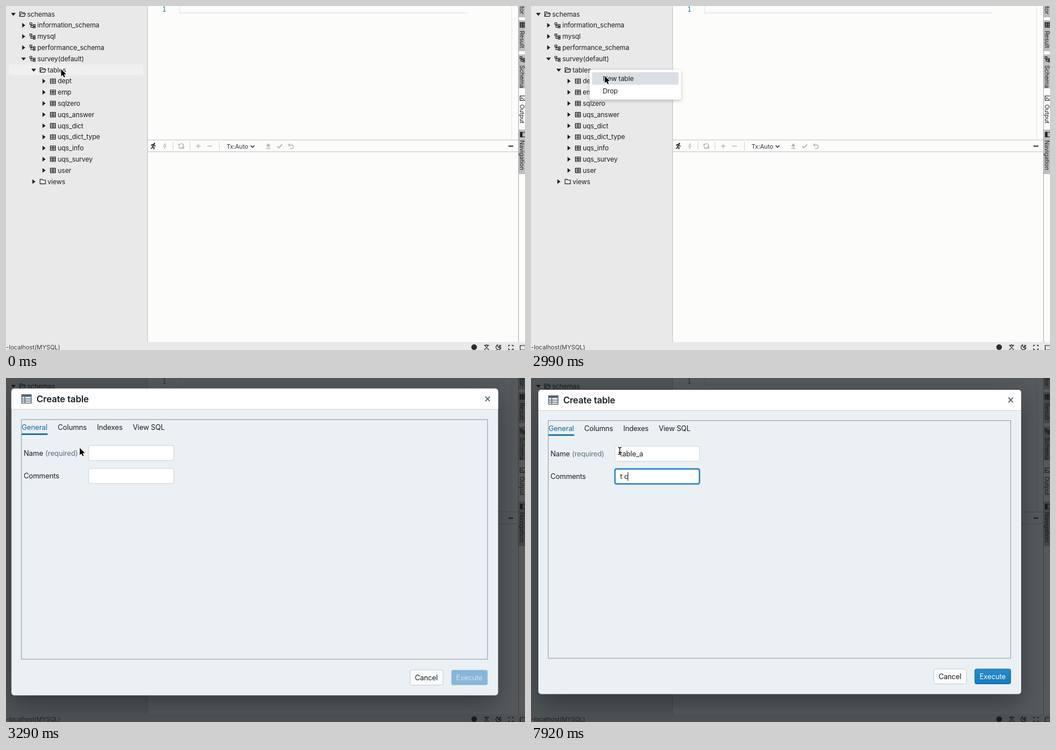
These frames come from a looping animation (918x610 px, 8000 ms). An HTML page with a canvas:

```html
<!DOCTYPE html>
<html lang="en">
<head>
<meta charset="utf-8">
<title>Create table</title>
<style>
html, body { margin: 0; width: 100%; height: 100%; overflow: hidden; background: #fcfcfb; }
canvas { display: block; }
</style>
</head>
<body>
<canvas id="stage" width="918" height="610"></canvas>
<script>
const W = 918, H = 610, LOOP = 8000;
const stage = document.getElementById('stage').getContext('2d');
const layer = document.createElement('canvas');
layer.width = W;
layer.height = H;
const sheet = layer.getContext('2d');
let g = stage;

const SANS = 'Inter, "Open Sans", sans-serif';
const MONO = '"DejaVu Sans Mono", monospace';
const INK = '#1b1e21', PALE = '#b4b6b8', BLUE = '#106ba3', SLATE = '#566574';

// Drawing helpers
function text(str, x, y, size, color = INK, { weight = 400, gap = -0.1, family = SANS } = {}) {
  g.font = `${weight} ${size}px ${family}`;
  g.letterSpacing = gap + 'px';
  g.fillStyle = color;
  g.fillText(str, x, y + size * 0.36);
}

function box(x, y, w, h, color) {
  g.fillStyle = color;
  g.fillRect(x, y, w, h);
}

function round(x, y, w, h, r, fill, border) {
  g.beginPath();
  g.roundRect(x, y, w, h, r);
  if (fill) { g.fillStyle = fill; g.fill(); }
  if (border) { g.strokeStyle = border; g.lineWidth = 1; g.stroke(); }
}

// Icon given as SVG path data around a centre
function icon(d, x, y, color = INK, { width = 1.2, fill = false } = {}) {
  g.save();
  g.translate(x, y);
  g.lineWidth = width;
  g.strokeStyle = g.fillStyle = color;
  const p = new Path2D(d);
  fill ? g.fill(p) : g.stroke(p);
  g.restore();
}

function shadow(color, y, blur) {
  g.shadowColor = color;
  g.shadowOffsetY = y;
  g.shadowBlur = blur;
}

const at = (keys, t) => keys.findLast(k => k[0] <= t);
const clamp = (v, lo, hi) => Math.min(hi, Math.max(lo, v));

const ICON = {
  down: 'M-4.2-2.2H4.2L0 3Z',
  right: 'M-2.4-4.2L3 0L-2.4 4.2Z',
  open: 'M-4.8 4V-3.8H-1L.3-2.4H3.8V-.6M-4.8 4L-2.8-.6H5.4L3.6 4Z',
  folder: 'M-4.8 4V-4H-1L.3-2.6H4.8V4Z',
  schema: 'M-4.8-4.4H-1.2V-1.2H-4.8ZM-3-1.2V3.4H.8M-3 .2H.8M1.2-1.4H4.6V1H1.2ZM1.2 2.4H4.6V4.6H1.2Z',
  table: 'M-4.5-4H4.5V4H-4.5ZM-4.5-1.4H4.5M-4.5 1.3H4.5M0-4V4',
  runner: 'M.6-3L-1.2 1L1.4 2.6L.8 5.6M-1.2 1L-2 3.2L-4.4 4.4M-3.4-.6L-2.4-2.8L.8-2.6L2.2-.4L4.2-.2',
  bolt: 'M.6-5L-2.6.8H-.2L-.8 5L2.6-1H.2Z',
  refresh: 'M4.6-.6A4.7 4.7 0 0 0-4-2.2M-4.6.6A4.7 4.7 0 0 0 4-2.2M-4.6-4.4V-1.6H-2M4.6 4.4V1.6H2M4.6.6A4.7 4.7 0 0 1-4 2.4',
  plus: 'M-4 0H4M0-4V4',
  minus: 'M-4.2 0H4.2',
  chevron: 'M-3.3-1.6L0 1.7L3.3-1.6',
  upload: 'M0-5L4-.6H1.4V2H-1.4V-.6H-4ZM-4 3.2H4V4.8H-4Z',
  check: 'M-4.2.2L-1.4 3L4.4-3.2',
  undo: 'M-1.8-4.6L-4.4-2L-1.8.6M-4.2-2H1.4A3 3 0 0 1 1.4 4H-1.6',
  terminal: 'M-4.6-4H5V4H-4.6ZM-2.6-1.6L-.8 0L-2.6 1.6M.4 1.8H3',
  translate: 'M-4.4-3.4H4.4M0-5V-3.4M-2.8-3.4C-1.6.2 1.4 3 4.2 4.4M2.8-3.4C1.6.2-1.4 3-4.2 4.4',
  moon: 'M-1-4.4A4.6 4.6 0 1 0 4.6 1.6A4.6 4.6 0 0 1-1-4.4M1.2-3.2H4.2L1.2-.4H4.4',
  full: 'M-4-1.4V-4H-1.4M1.4-4H4V-1.4M4 1.4V4H1.4M-1.4 4H-4V1.4',
  square: 'M-4-4H5V4H-4Z',
  close: 'M-4-4L4 4M4-4L-4 4',
  arrow: 'M0 0V12.8L2.9 10.1L4.9 14.6L7 13.7L5 9.3H9Z',
  beam: 'M-3-6.2Q0-6.2 0-4.4Q0-6.2 3-6.2M0-4.6V4.8M-3 6.2Q0 6.2 0 4.6Q0 6.2 3 6.2M-2 2.6H2'
};

// Tree: level, label, icon, expanded
const ROWS = [
  [0, 'schemas', 'open', 1],
  [1, 'information_schema', 'schema'],
  [1, 'mysql', 'schema'],
  [1, 'performance_schema', 'schema'],
  [1, 'survey(default)', 'schema', 1],
  [2, 'tables', 'open', 1],
  ...['dept', 'emp', 'sqlzero', 'uqs_answer', 'uqs_dict', 'uqs_dict_type',
    'uqs_info', 'uqs_survey', 'user'].map(s => [3, s, 'table']),
  [2, 'views', 'folder']
];
const PITCH = 19.8;

function tree(hover) {
  box(0, 0, 250, H, '#e9e9e9');
  if (hover >= 0) box(5, 4.5 + hover * PITCH, 238, 19, '#f0f0f0');
  ROWS.forEach(([level, label, kind, expanded], i) => {
    const x = level * 18, y = 14.4 + i * PITCH;
    icon(expanded ? ICON.down : ICON.right, x + 13, y, INK, { fill: true });
    icon(ICON[kind], x + 29, y, INK, { width: 1.1 });
    text(label, x + 37.5, y, 11.7);
  });
}

function editor() {
  box(250, 0, W - 250, 596, '#fcfcfb');
  text('1', 276.5, 5.5, 11.5, '#237893', { family: MONO, gap: 0 });
  box(307, 11.5, 509, 1.8, '#e8e8e8');
  box(306.5, 0, 1, 13, '#e2e2e2');
  box(894, 0, 1, 237, '#e4e4e4');
  box(250, 0, 1, 596, '#c3c3c3');
  box(250, 237, 657, 1, '#c3c3c3');
  box(250, 258, 657, 1, '#c3c3c3');
}

function toolbar() {
  const y = 248.5;
  icon(ICON.runner, 260.5, y, INK, { width: 1.5 });
  icon('M.4-5.6H3V-3H.4Z', 260.5, y, INK, { fill: true });
  icon(ICON.bolt, 281, y, PALE, { width: 1 });
  icon(ICON.refresh, 310, y, PALE);
  icon(ICON.plus, 340, y, PALE, { width: 1.4 });
  icon(ICON.minus, 360, y, PALE, { width: 1.4 });
  for (const x of [295, 325, 377]) box(x, 241, 1, 15, '#cfcfcf');
  text('Tx:Auto', 390, y + 0.5, 10.8, '#33373a');
  icon(ICON.chevron, 436, y + 0.5, '#33373a', { width: 1.6 });
  icon(ICON.upload, 464, y, PALE, { fill: true });
  icon(ICON.check, 484, y, PALE, { width: 1.9 });
  icon(ICON.undo, 504, y, PALE, { width: 1.3 });
  icon(ICON.minus, 893, y, INK, { width: 1.9 });
}

function sidebar() {
  box(906, 0, 1, 596, '#a9a9a9');
  // top, height, text start, label
  const tabs = [[0, 20, -14, 'Editor'], [25, 55, 44, 'Result'], [86, 60, 105, 'Schema'],
    [152, 62, 174.5, 'Output'], [219, 79, 238, 'Navigation']];
  for (const [top, h, start, label] of tabs) {
    if (label !== 'Output') box(907, top, 11, h, '#bdbdbd');
    g.save();
    g.translate(913, start);
    g.rotate(Math.PI / 2);
    text(label, 0, 0, 10.7);
    g.restore();
  }
  icon(ICON.table, 914, 33.5, INK, { width: 1.5 });
  icon(ICON.schema, 914, 94.5);
  icon(ICON.terminal, 914, 163.5);
  icon(ICON.square, 914, 228);
  box(909.5, 223.5, 4, 9, INK);
}

function statusBar() {
  box(0, 596, W, 14, '#e9e9e9');
  text('l-localhost(MYSQL)', -2.2, 605.5, 10.8, '#3a3d40');
  g.beginPath();
  g.arc(828, 605, 5, 0, 7);
  g.fillStyle = '#2b2e31';
  g.fill();
  icon(ICON.translate, 850, 605);
  icon(ICON.moon, 871, 605);
  icon(ICON.full, 893, 605.5);
  icon(ICON.square, 913.5, 606);
}

function menu(state) {
  g.save();
  shadow('rgba(16,22,26,.25)', 2, 6);
  round(103.5, 113, 162, 53, 3, '#fff');
  g.restore();
  if (state) round(108, 117.5, 153, 22, 2, state > 1 ? '#d9dfe4' : '#e6eaed');
  text('New table', 127, 128.5, 11.7);
  text('Drop', 127, 150.5, 11.7);
}

function field(x, y, str, focus, caret) {
  round(x, y, 149.5, 26.5, 3, '#fff', '#cdd3d8');
  if (focus) {
    g.save();
    g.globalAlpha *= focus;
    g.lineWidth = 3.6;
    g.strokeStyle = 'rgba(19,124,189,.3)';
    g.stroke();
    g.lineWidth = 1.9;
    g.strokeStyle = '#1c80c0';
    g.stroke();
    g.restore();
  }
  text(str, x + 9, y + 13.3, 12.5, INK, { gap: -0.15 });
  if (caret) {
    const end = str ? g.measureText(str).width : 0;
    box(Math.round(x + 8.6 + end), y + 5.5, 1, 15.5, INK);
  }
}

// Text typed into each field
const NAME = [[0, ''], [5010, 'ta'], [5100, 'tab'], [5270, 'tabl'], [5420, 'table'],
  [5780, 'table_'], [6050, 'table_a']];
const NOTE = [[0, ''], [7470, 't'], [7650, 't '], [7920, 't c']];
// Focus strength and caret visibility
const NAME_FOCUS = [[0, 0], [3820, 0.35], [3910, 0.7], [4000, 1], [6400, 0.45], [6490, 0]];
const NOTE_FOCUS = [[0, 0], [6400, 0.55], [6490, 1]];
const NAME_CARET = [[0, 0], [3820, 1], [4350, 0], [4830, 1], [6400, 0]];
const NOTE_CARET = [[0, 0], [6400, 1], [6940, 0], [7390, 1]];

function dialog(t, scale) {
  const label = (s, x, y, color) => text(s, x, y, 12.5, color, { gap: -0.15 });
  const val = keys => at(keys, t)[1];

  g.save();
  shadow('rgba(16,22,26,.45)', 16 * scale, 44 * scale);
  round(13, 21, 854, 539.5, 5, '#ebf0f4');
  g.restore();
  round(13, 21, 854, 36, [5, 5, 0, 0], '#fff');
  box(13, 57, 854, 1, '#d0d6db');
  icon('M-8.3-7.5H8.3V7.5H-8.3ZM-8.3.2H8.3M-8.3 3.8H8.3M-2.8-4V7.5', 39.5, 39, SLATE, { width: 1.4 });
  box(31, 31.5, 17, 4, SLATE);
  text('Create table', 57, 39.5, 15.9, '#182026', { weight: 600, gap: -0.15 });
  icon(ICON.close, 848.5, 39, SLATE, { width: 1.8 });

  g.strokeStyle = '#8e979e';
  g.lineWidth = 1;
  g.strokeRect(30.5, 75.5, 818, 421.5);
  label('General', 31, 89.5, BLUE);
  box(31, 99.8, 45.5, 2.7, BLUE);
  label('Columns', 94.3, 89.5);
  label('Indexes', 163.2, 89.5);
  label('View SQL', 226, 89.5);

  label('Name', 34.5, 134.3);
  label('(required)', 72.5, 134.3, '#5c7080');
  label('Comments', 34.5, 174.8);
  field(148.5, 121, val(NAME), val(NAME_FOCUS), val(NAME_CARET));
  field(148.5, 161.3, val(NOTE), val(NOTE_FOCUS), val(NOTE_CARET));

  round(712.5, 516, 58, 26.5, 3, '#fafbfc', '#c5cbd0');
  label('Cancel', 721, 529.3);
  const ready = t >= 5100;
  let face = '#85b7d9';
  if (ready) {
    face = g.createLinearGradient(0, 516, 0, 543);
    face.addColorStop(0, '#2a8aca');
    face.addColorStop(1, '#137cbd');
  }
  round(785, 516, 63.5, 26.5, 3, face, ready ? '#136ea8' : null);
  label('Execute', 793.5, 529.3, ready ? '#fff' : '#cfe2ef');
}

// Draws a group scaled about a point, with one opacity
function group(paint, alpha, scale, ox, oy) {
  g = sheet;
  g.clearRect(0, 0, W, H);
  g.save();
  g.translate(ox, oy);
  g.scale(scale, scale);
  g.translate(-ox, -oy);
  paint();
  g.restore();
  g = stage;
  g.globalAlpha = alpha;
  g.drawImage(layer, 0, 0);
  g.globalAlpha = 1;
}

// Pointer circles the table list twice, then goes to the menu and the first field
const MOVES = [[1310, 100.5, 111.5], [1490, 101.5, 112.5], [2420, 110, 116], [2500, 124, 121],
  [2570, 130.5, 124], [3480, 136, 126], [3580, 147, 128], [3670, 157, 129.3]];

function pointer(t) {
  if (t < 90) return [97.5, 112];
  if (t >= 1310) return at(MOVES, t).slice(1);
  const second = t >= 950;
  const turn = second ? (Math.floor((t - 950) / 72) + 1) / 6
    : clamp(Math.floor((t - 90) / 88.8) + 1, 0, 10) / 10;
  const a = -2 + turn * Math.PI * 2;
  return second ? [118.5 + 50 * Math.cos(a), 157 + 46 * Math.sin(a)]
    : [119 + 52 * Math.cos(a), 148 + 36 * Math.sin(a)];
}

function cursor(t, x, y) {
  if (t >= 3670) {
    icon(ICON.beam, x, y, 'rgba(255,255,255,.8)', { width: 2.6 });
    icon(ICON.beam, x, y, '#000', { width: 1.2 });
  } else {
    icon(ICON.arrow, x, y, '#fff', { width: 2 });
    icon(ICON.arrow, x, y, '#000', { fill: true });
  }
}

// time, scale, opacity
const MENU = [[0, 0, 0], [2090, 0.7, 0.4], [2170, 0.95, 0.9], [2240, 1, 1], [3080, 1, 0.22], [3170, 0, 0]];
// time, scale, opacity, backdrop
const DIALOG = [[0, 0, 0, 0], [3080, 0.617, 0.26, 0.25], [3170, 0.964, 0.92, 0.62],
  [3290, 1.008, 1, 0.7], [3380, 1, 1, 0.7]];

function draw(t) {
  const [x, y] = pointer(t);
  tree(t < 2090 ? Math.floor((y - 4.4) / PITCH) : -1);
  editor();
  toolbar();
  sidebar();
  statusBar();

  const [, menuScale, menuAlpha] = at(MENU, t);
  const [, scale, alpha, shade] = at(DIALOG, t);
  if (shade) box(0, 0, W, H, `rgba(16,22,26,${shade})`);
  if (menuAlpha) {
    const state = t >= 3080 ? 0 : t >= 2990 ? 2 : t >= 2420 ? 1 : 0;
    group(() => menu(state), menuAlpha, menuScale, 103.5, 113);
  }
  if (alpha) group(() => dialog(t, scale), alpha, scale, 440, 290.5);
  cursor(t, x, y);
}

function tick() {
  draw(performance.now() % LOOP);
  requestAnimationFrame(tick);
}
tick();
</script>
</body>
</html>
```
